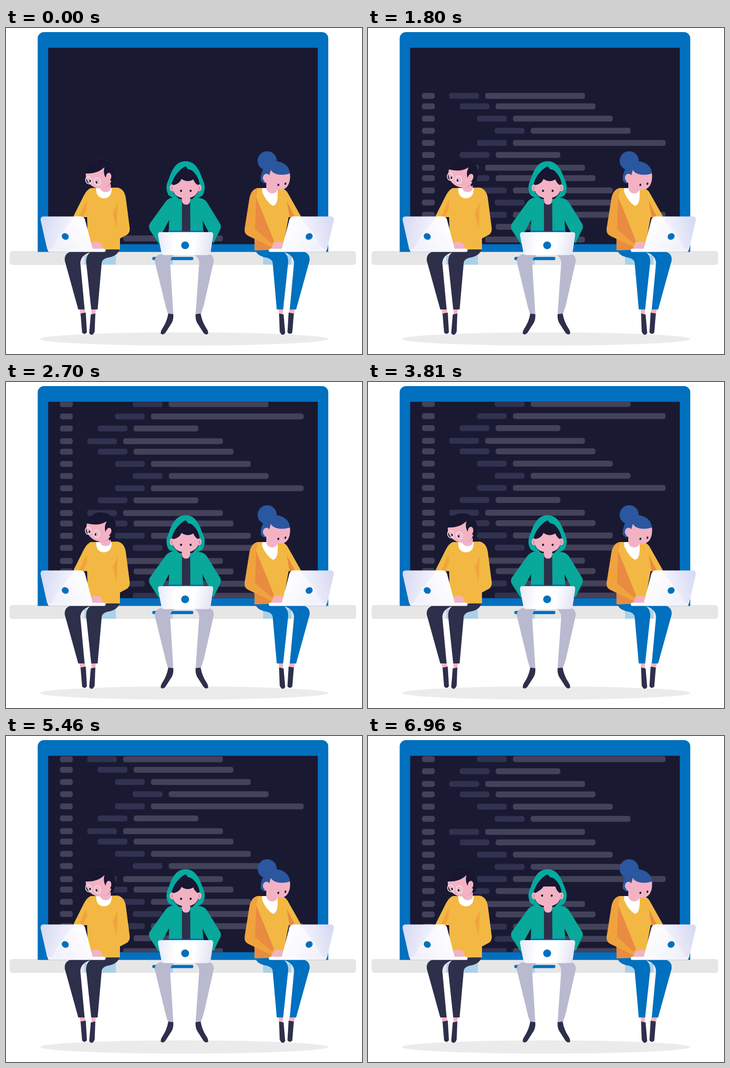
These frames come from a looping animation (781x717 px, 8000 ms). An HTML page with a canvas:

```html
<!DOCTYPE html>
<html lang="en">
<head>
<meta charset="utf-8">
<title>Coders on a bench</title>
<style>
html, body { margin: 0; width: 100%; height: 100%; overflow: hidden; background: #fff; }
canvas { display: block; width: 781px; height: 717px; }
</style>
</head>
<body>
<canvas id="stage" width="781" height="717"></canvas>
<script>
const ctx = document.getElementById('stage').getContext('2d');
const LOOP = 8000;
const BLUE = '#0070bf', NAVY = '#1a1932', INK = '#2e2f4b', HAIR = '#181630';
const SKIN = '#f2b2c4', YELLOW = '#f3b843', AMBER = '#f0a33d', ORANGE = '#e98b41';
const TEAL = '#04aaa0', GREY = '#b9bad0', SKY = '#a9d1ea';

const path = (d, color) => { ctx.fillStyle = color; ctx.fill(new Path2D(d)); };
const rect = (x, y, w, h, color, r = 0) => {
  ctx.fillStyle = color;
  ctx.beginPath();
  ctx.roundRect(x, y, w, h, r);
  ctx.fill();
};
const oval = (x, y, rx, ry, color, tilt = 0) => {
  ctx.fillStyle = color;
  ctx.beginPath();
  ctx.ellipse(x, y, rx, ry, tilt, 0, Math.PI * 2);
  ctx.fill();
};
const ring = (x, y, rx, ry, tilt) => {
  ctx.strokeStyle = '#ebe6ee';
  ctx.lineWidth = 1.8;
  ctx.beginPath();
  ctx.ellipse(x, y, rx, ry, tilt, 0, Math.PI * 2);
  ctx.stroke();
};
const linear = (x0, y0, x1, y1, ...stops) => {
  const g = ctx.createLinearGradient(x0, y0, x1, y1);
  stops.forEach((c, i) => g.addColorStop(i / (stops.length - 1), c));
  return g;
};
const mirrored = (axis, fn) => {
  ctx.save();
  ctx.translate(axis * 2, 0);
  ctx.scale(-1, 1);
  fn();
  ctx.restore();
};
const ease = (t, a, b) => {
  const p = Math.min(1, Math.max(0, (t - a) / (b - a)));
  return p * p * (3 - 2 * p);
};

// Scroll position over time, joined by a monotone cubic.
const KEYS = [[0, 463], [810, 312.5], [1170, 245], [1620, 182.5], [2310, 44.5], [2730, -28.5],
  [5190, -28.5], [5460, -106.5], [6240, -177], [6960, -210.5], [LOOP, -210.5]];
const secant = i => (KEYS[i + 1][1] - KEYS[i][1]) / (KEYS[i + 1][0] - KEYS[i][0]);
const SLOPES = KEYS.map((_, i) => {
  if (i === 0) return secant(0);
  if (i === KEYS.length - 1) return 0;
  const a = secant(i - 1), b = secant(i);
  return a * b > 0 ? 2 * a * b / (a + b) : 0;
});
function scrollAt(t) {
  let i = 0;
  while (i < KEYS.length - 2 && t >= KEYS[i + 1][0]) i++;
  const [t0, y0] = KEYS[i], [t1, y1] = KEYS[i + 1];
  const h = t1 - t0, p = (t - t0) / h, q = 1 - p;
  return y0 * q * q * (1 + 2 * p) + y1 * p * p * (3 - 2 * p)
    + h * p * q * (SLOPES[i] * q - SLOPES[i + 1] * p);
}

// Code rows: offset in block, label x, bar x, bar width.
const LINES = [[0, 178, 257, 219], [23, 201, 280, 219], [50, 239, 318, 219],
  [76.7, 278, 357, 219], [103.5, 239, 318, 335], [130, 201, 280, 142]];
const BLOCKS = [[0, 6], [158, 6], [316, 4], [421.5, 6], [580, 6]];

function bench() {
  rect(8, 490.5, 760, 30.5, '#e6e6e6', 6);
  oval(391, 684, 316, 14.5, '#ebebeb');
  rect(172, 500, 69, 20.5, SKY);
  rect(340, 509, 26, 11.5, SKY);
  rect(564, 500, 62, 20.5, SKY);
  rect(321, 503.5, 90, 7, BLUE, 3);
}

function monitor(t) {
  rect(69.5, 9, 637.5, 483.5, BLUE, [14, 14, 0, 0]);
  rect(92.5, 43.5, 591.5, 432, NAVY);
  ctx.save();
  ctx.beginPath();
  ctx.rect(92.5, 43.5, 591.5, 432);
  ctx.clip();
  const top = scrollAt(t) - 6.5;
  for (const [start, count] of BLOCKS) {
    for (const [dy, label, bar, width] of LINES.slice(0, count)) {
      const y = top + start + dy;
      if (y < 25 || y > 480) continue;
      rect(118.5, y, 28, 13, '#43425a', 5);
      rect(label, y, 65.5, 13, '#313150', 5);
      rect(bar, y, width, 13, '#43425a', 5);
    }
  }
  ctx.restore();
}

function sideLegs(color) {
  path('M161 617H173L174.5 629H163ZM187 617H197L196 630H188Z', SKIN);
  path('M163.5 628L175 626L177.5 669Q173 676 167 670ZM186 630L196 628L194.5 668Q189 680 182.5 671Z', INK);
  path('M148 491H196Q165 495 163 516L172.5 619H158.5L129 512Q127 493 148 491Z', color);
  path('M188 491L249 485Q247 499 229 504Q212 506 210 516L201 619H187L176 516Q175 498 188 491Z', color);
}

function sideLaptop() {
  path('M82 414.5H164Q171 414.5 173 421L190 486V492H98Q92 491 90 485L76 423Q75 414.5 82 414.5Z',
    linear(78, 420, 158, 440, '#d6d9f3', '#fafaff'));
  path('M152 414.5H164Q171 414.5 173 421L190 486V492H97L118 455Z',
    linear(110, 480, 175, 430, '#f1f1fc', '#ffffff'));
  rect(92, 485.5, 126.5, 7, linear(92, 0, 218, 0, '#f0f0fa', '#ffffff'), 3.5);
  oval(130, 458.5, 8, 7, BLUE, 0.6);
}

function leftHead(t) {
  const up = ease(t, 1620, 1770) - ease(t, 3630, 3810);
  ctx.save();
  ctx.translate(212, 328 - up);
  ctx.rotate(0.22 * up);
  ctx.translate(-212, -328);
  oval(207.5, 320.5, 32.4, 32.4, 'rgba(90,88,110,.35)');
  path('M175 320C175 301 189 288.5 207.5 288.5C226 288.5 240 303 240 321C240 331 238 336 236 339L239 341'
    + 'Q234 341 232 346L224 338L205 320Z', HAIR);
  path('M175 320Q201 321 216 306Q212 322 221 332L231 336C229 345 220 353 207 353C190 353 174 340 175 320Z', SKIN);
  oval(225, 327.5, 6, 9, SKIN, 0.15);
  oval(184.5, 336.5, 1.9, 2.7, HAIR, -0.3);
  oval(198.5, 339.5, 1.9, 2.7, HAIR, -0.3);
  ring(181, 335, 6.2, 8, -0.35);
  ring(200.5, 337.5, 6.4, 8.2, -0.35);
  ctx.restore();
}

function leftCoder(t) {
  sideLegs(INK);
  path('M186 352Q178 355 171 368L147 416H182V380Z', YELLOW);
  path('M178 376L180 392L169 416H160Z', AMBER);
  path('M186 352L245 351Q260 354 263 375L271.5 441Q272 452 263 456L250 463V487H180Q178 420 177 382Q177 359 186 352Z', YELLOW);
  path('M234 408L245 384L243 440Z', AMBER);
  path('M198 352C197 368 205 374.5 215 374.5C226 374.5 232 367 232 352Z', '#fff');
  path('M204 342H230V350Q230 361 218 361Q208 361 206 350Z', SKIN);
  leftHead(t);
  path('M183 486L186 474Q196 467 208 473L214 486Z', SKIN);
  sideLaptop();
}

function middleShoe() {
  path('M356 628L367 629Q368 640 364 648L350 670Q344 677 339.5 672Q339 667 343 661Q353 646 356 628Z', INK);
}

function middleCoder(t) {
  const up = ease(t, 6800, 6960);
  path('M326 512Q328 496 348 497H374Q361 503 360 515L367 628H355L351 615Z', GREY);
  path('M456 512Q455 496 440 497H410Q423 503 424 515L416 628H428L434 610Z', GREY);
  middleShoe();
  mirrored(391.5, middleShoe);
  path('M372 372Q358 372 350 382L315 431Q312 438 316 445L336 476L343 450L358 422L357 449H433L431 423L445 450L455 474'
    + 'L470 443Q473 437 470 431L440 382Q434 374 418 373Z', '#08a89b');
  rect(356, 445.5, 78, 4.5, BLUE);
  path('M394 293C373 293 364 312 357.5 331C351 345 350 354 356 367Q364 374 374 374H414Q425 374 432 367'
    + 'C438 354 437 345 430.5 331C424 312 415 293 394 293Z', TEAL);
  path('M386 368H404L404.5 447H386Z', INK);
  path('M363 348C364 332 377 313 394 304L400 311Q406 311 411 316C420 325 425 336 425 348L420 364L409 376H380L368 364Z', HAIR);
  path('M386 370H404V380Q403 388.5 395 388.5Q387 388.5 386 380Z', SKIN);
  oval(364, 351.5, 5, 7.5, SKIN);
  oval(424, 351.5, 5, 7.5, SKIN);
  oval(364, 352, 2.3, 4, '#df929e');
  oval(424, 352, 2.3, 4, '#df929e');
  const fringe = `M366 346Q381 ${343 - 5 * up} 385 ${332 - up}Q398 ${341 - 10 * up} 411 ${333 - 2 * up}Q414 342 422 346`;
  path(fringe + 'C425 363 413 374.5 394 374.5C375 374.5 363 363 366 346Z', SKIN);
  oval(384 - 2 * up, 358 - 7 * up, 2.3, 2.5, HAIR);
  oval(405 - 2 * up, 358 - 7 * up, 2.3, 2.5, HAIR);
  path('M338 449H450Q455 449 454.5 456L449 493Q448 499.5 442 499.5H348Q342 499.5 341 494L333.5 456Q333 449 338 449Z',
    linear(333, 450, 454, 470, '#e6e7f7', '#ffffff', '#ffffff', '#e0e2f5'));
  oval(393, 478, 8.7, 8.5, BLUE);
}

function rightHead() {
  oval(573, 292, 21, 21, '#2a579f');
  path('M559 336C557 313 572 293 594 293C611 295 623 306 623 322L590 335L566 342Z', '#2a579f');
  path('M581 312C586 322 603 326 623 320C625 341 617 356 601 356Q592 356 588 350L566 338L576 330Z', SKIN);
  oval(571.5, 329.5, 8, 9, SKIN);
  path('M571 336H597V352Q595 363 584 364Q573 363 571 353Z', SKIN);
  oval(597.5, 345, 2, 2.7, HAIR, 0.3);
  oval(613, 342.5, 2, 2.7, HAIR, 0.3);
}

function rightCoder() {
  mirrored(397.5, () => sideLegs(BLUE));
  path('M550 352H605Q615 355 621 368L648 416H620L607 487L546 489L543 400Z', YELLOW);
  path('M616 380L634 416H622Z', ORANGE);
  path('M546 455L585 478L583 487L545 489Z', ORANGE);
  path('M554 352Q538 353 534 375L523.5 441Q522 452 531 457L583 482L588 469L546 437L549 372Z', AMBER);
  path('M549 372L588 469L583 474L546 442Z', ORANGE);
  path('M562 352V361Q571 382 585 391Q597 390 596 362V352Z', '#fff');
  rightHead();
  path('M612 486L609 474Q599 467 587 473L581 486Z', SKIN);
  mirrored(397.5, sideLaptop);
}

function draw(t) {
  ctx.fillStyle = '#fff';
  ctx.fillRect(0, 0, 781, 717);
  bench();
  monitor(t);
  leftCoder(t);
  middleCoder(t);
  rightCoder();
}

const begin = performance.now();
function tick() {
  draw((performance.now() - begin) % LOOP);
  requestAnimationFrame(tick);
}
tick();
</script>
</body>
</html>
```
